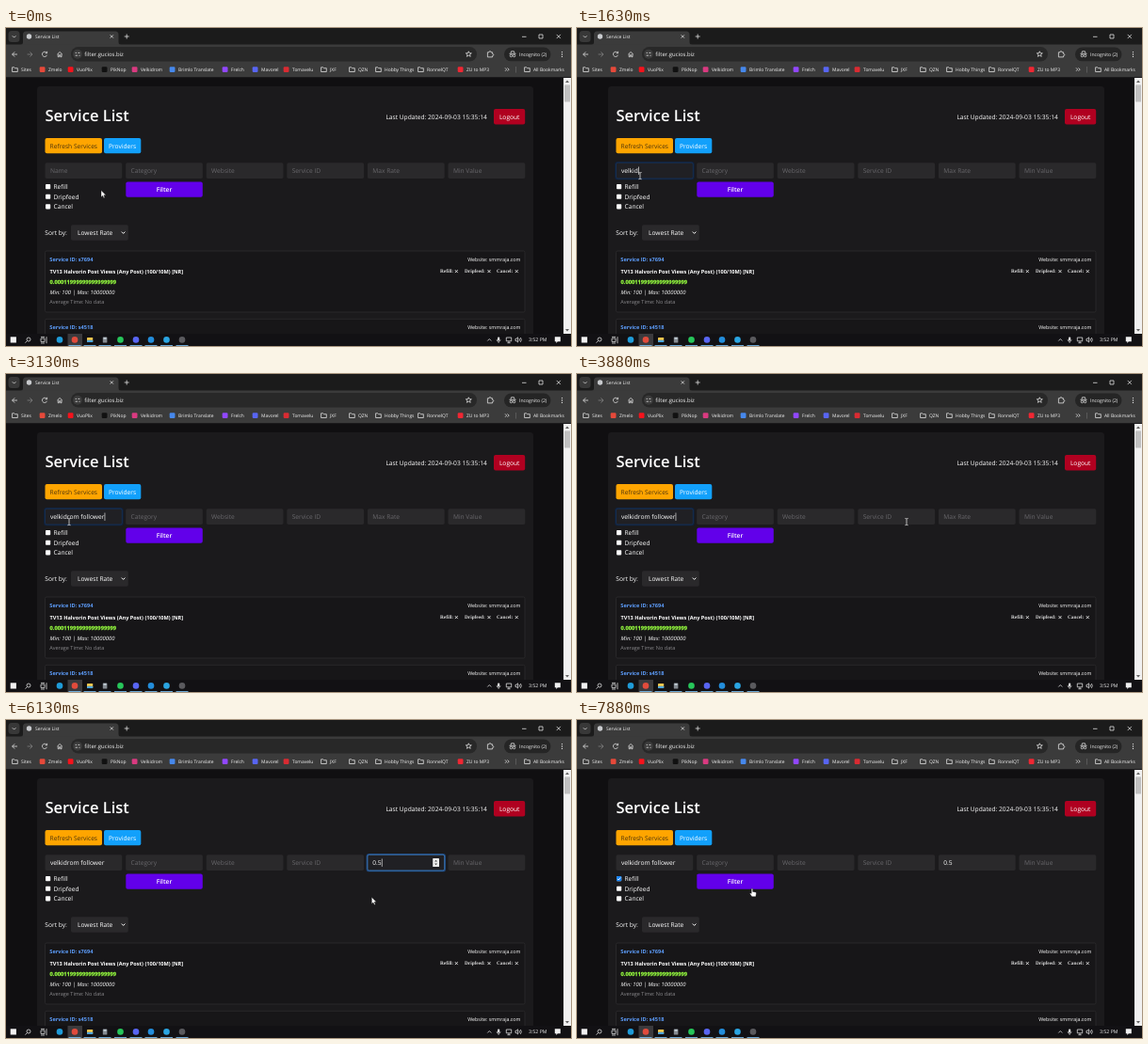
Recreate the animation shown at these times as an HTML page. Size 600 by 338 pixels, loop 8000 ms.

```html
<!DOCTYPE html>
<html lang="en">
<head>
<meta charset="utf-8">
<title>Service List</title>
<style>
  html, body { margin: 0; width: 100%; height: 100%; overflow: hidden; background: #111012; }
  svg { display: block; width: 100vw; height: 100vh; }
  text { font-family: "Open Sans", "Noto Sans", sans-serif; font-size: 6.65px; fill: #fff;
         white-space: pre; text-rendering: geometricPrecision; }
  .ui { font-size: 4.95px; fill: #f4f4f4; }
  .hint { fill: #68676b; }
  .mid { text-anchor: middle; }
  .end { text-anchor: end; }
  .bold { font-weight: 700; }
  .flag { font: 700 5.3px "Liberation Serif", "Noto Serif", serif; fill: #dcdcdc; }
  .line { fill: none; stroke: #e8e8e8; stroke-width: .75; }
</style>
</head>
<body>
<svg id="stage" viewBox="0 0 600 338" preserveAspectRatio="none"></svg>
<script>
const stage = document.getElementById('stage');

const rect = (x, y, w, h, fill, r = 0, extra = '') =>
  `<rect x="${x}" y="${y}" width="${w}" height="${h}" rx="${r}" fill="${fill}" ${extra}/>`;
const dot = (x, y, r, fill) => `<circle cx="${x}" cy="${y}" r="${r}" fill="${fill}"/>`;
const text = (x, y, str, cls = '', style = '') =>
  `<text x="${x}" y="${y}" class="${cls}" style="${style}">${str}</text>`;
const line = (d, style = '') => `<path class="line" d="${d}" style="${style}"/>`;
const cross = (x, y, r, style) =>
  line(`M${x - r} ${y - r}l${2 * r} ${2 * r}M${x + r} ${y - r}l${-2 * r} ${2 * r}`, style);
const folder = x => line(`M${x - 2.8} 41.8h2.2l.9 .9h2.6v3.8h-5.7z`);

function tabStrip() {
  return rect(0, 0, 600, 18, '#1b1b1b')
    + rect(2.5, 3, 12, 12, '#383838', 3.5) + line('M6.8 8.3l1.8 1.8l1.8-1.8')
    + `<path d="M15 18q3 0 3-3V7q0-3.5 3.5-3.5H116q3.5 0 3.5 3.5v8q0 3 3 3z" fill="#3b3b3b"/>`
    + dot(24.5, 9, 2.7, '#c9cbce') + text(31, 10.9, 'Service List', 'ui')
    + cross(112.3, 9, 1.6) + line('M125.7 9h5M128.2 6.5v5')
    + line('M548 9.3h4.5M566 7h4v4h-4z') + cross(586.8, 9, 2.1);
}

function toolbar() {
  return rect(0, 17.5, 600, 35, '#3b3b3b')
    + line('M12 28H6.6M9.2 25.4L6.6 28l2.6 2.6')
    + line('M22.6 28H28M25.4 25.4L28 28l-2.6 2.6', 'stroke:#858585')
    + line('M43.2 26.4a2.6 2.6 0 1 0 .3 2.4M43.6 24.8v2h-2')
    + line('M54.6 27.8l2.5-2.3l2.5 2.3M55.2 27.4v3.3h1.2v-2h1.4v2H59v-3.3')
    + rect(69, 20, 431, 15.6, '#282828', 7.8) + dot(76, 27.8, 5, '#3b3b3b')
    + line('M73.6 26.4h1.4m1.4 0h2M73.6 29.2h2.4m1.4 0h1.2')
    + text(83.3, 29.9, 'filter.gucios.biz', 'ui', 'font-size:5.95px')
    + line('M491.3 24.8l.9 2h2.1l-1.7 1.4l.6 2.1l-1.9-1.2l-1.9 1.2l.6-2.1l-1.7-1.4h2.1z')
    + line('M511.4 25.8h1.6q0-1.2 1-1.2t1 1.2h1.6v1.7q1.2 0 1.2 1t-1.2 1v1.4h-5.2z')
    + rect(529, 20.5, 49.5, 14.8, '#252525', 7.4)
    + line('M534.5 27.3h7M536 26.8l.5-2h3l.5 2')
    + line('M535.2 29.5a1.2 1.2 0 1 0 2.4 0a1.2 1.2 0 1 0-2.4 0M538.4 29.5a1.2 1.2 0 1 0 2.4 0a1.2 1.2 0 1 0-2.4 0')
    + text(545, 29.6, 'Incognito (2)', 'ui', 'font-size:5.1px')
    + [25.6, 28, 30.4].map(y => dot(590.5, y, .65, '#e8e8e8')).join('');
}

function bookmarks() {
  // label x, label, icon colour (none = folder)
  const items = [
    [16, 'Sites'], [45, 'Zmelo', '#e5493a'], [75, 'VuoPlix', '#f5131c'], [111, 'PikNop', '#111'],
    [143, 'Velkidrom', '#d93a80'], [183, 'Brimlo Translate', '#4688ec'], [239, 'Frelch', '#9147ff'],
    [271, 'Mavorel', '#5865f2'], [304, 'Tomavelu', '#d92b32'], [344, 'JXF'], [374, 'QZN'],
    [402, 'Hobby Things'], [447, 'RonnelQT'], [489, 'ZU to MP3', '#ef2733'], [560, 'All Bookmarks']
  ];
  return items.map(([x, label, color]) =>
    (color ? rect(x - 9.3, 41.2, 5.8, 5.8, color, 1.2) : folder(x - 6.6)) + text(x, 46, label, 'ui')).join('')
    + line('M530 42.4l1.7 1.7l-1.7 1.7M532.5 42.4l1.7 1.7l-1.7 1.7') + line('M541.5 41v6.5', 'stroke:#666');
}

const fieldX = i => 41.5 + i * 85.6;
const field = (i, hint) => rect(fieldX(i), 143.2, 81.8, 16.8, '#2a292b', 1.8)
  + text(fieldX(i) + 5.4, 154.3, hint, 'hint');

function card(y, id) {
  return rect(41.5, y, 509.5, 65, '#171618', 1.5, 'stroke="#302f32" stroke-width=".7"')
    + text(46.3, y + 11, `Service ID: ${id}`, 'bold', 'font-size:5.6px;fill:#5d9dfb')
    + text(546.5, y + 11, 'Website: smmraja.com', 'end', 'font-size:5.3px');
}

function page() {
  const flags = [[461, 'Refill:', 478.3], [487, 'Dripfeed:', 513], [521, 'Cancel:', 542.3]];
  return rect(0, 52.5, 600, 272.5, '#100f11')
    + rect(33, 62, 527, 280, '#1b1a1c', 3.5)
    + text(41.5, 99.2, 'Service List', '', 'font-size:16.55px;font-weight:600')
    + text(403.4, 96.8, 'Last Updated: 2024-09-03 15:35:14')
    + rect(518, 86, 33.2, 16.4, '#b00020', 2) + text(534.7, 96.8, 'Logout', 'mid', 'font-weight:500')
    + rect(41.5, 117, 60.5, 16.2, '#ffa500', 2)
    + text(71.8, 127.6, 'Refresh Services', 'mid', 'fill:#4a340c')
    + rect(104, 117, 39.3, 16.2, '#12a0fb', 2) + text(123.6, 127.6, 'Providers', 'mid', 'font-weight:500')
    + ['', 'Category', 'Website', 'Service ID', '', 'Min Value'].map((hint, i) => field(i, hint)).join('')
    + rect(127.3, 163.4, 81.5, 16.4, '#6200ea', 2) + text(168, 174.1, 'Filter', 'mid', 'font-weight:600')
    + ['Refill', 'Dripfeed', 'Cancel'].map((label, i) =>
        rect(42, 166.1 + i * 10.55, 5.2, 5.2, '#fff', .8) + text(50.5, 171.3 + i * 10.55, label)).join('')
    + text(41.3, 220.3, 'Sort by:') + rect(69, 209.3, 60.8, 16.5, '#2a292b', 1.8)
    + text(76, 220.3, 'Lowest Rate') + line('M122.8 216.6l1.8 1.8l1.8-1.8', 'stroke-width:1;stroke:#fff')
    + card(237, 's7694')
    + text(46.5, 260.7, 'TV13 Halvorin Post Views (Any Post) (100/10M) [NR]', 'bold', 'font-size:5.6px')
    + text(46.5, 271.6, '0.00011999999999999999', 'bold',
        'font-size:5.75px;fill:#93f83e;stroke:#93f83e;stroke-width:.25')
    + text(46.5, 282.5, 'Min: 100 | Max: 10000000', '', 'font-size:5.9px;font-style:italic')
    + text(46.3, 293.3, 'Average Time: No data', '', 'font-size:5.5px;fill:#8b8a8d')
    + flags.map(([x, label, cx]) => text(x, 260.3, label, 'flag') + cross(cx, 258.6, 1.5, 'stroke-width:.9')).join('')
    + card(309.3, 's4518')
    + rect(592, 53, 8, 272, '#f1f1f1') + rect(593, 60.5, 6, 18, '#c1c1c1')
    + `<path d="M594 58l2-2.4l2 2.4zM594 320l2 2.4l2-2.4z" fill="#606060"/>`;
}

function taskbar() {
  const apps = [[57, '#1f9bd8'], [73, '#e14b3c'], [121.5, '#27c65a'], [138, '#5865f2'],
    [154, '#238ddb'], [170.5, '#2aa5e2'], [187, '#5a5a5e']];
  return rect(0, 325, 600, 13, '#121114') + rect(65.5, 325, 15.5, 13, '#3b3a3d')
    + [73, 89, 105, 121.5, 138, 154, 170.5, 187].map(x => rect(x - 6.5, 337.1, 13, .9, '#76b9ed')).join('')
    + rect(4.7, 328.3, 6.2, 6.2, '#f2f2f2')
    + line('M22.4 332.6l-2 2M22 331a2 2 0 1 0 4 0a2 2 0 1 0-4 0')
    + line('M37 330h4v3.4h-4zM37 328.4h4M37 335h4M43 328.2v7')
    + apps.map(([x, color]) => dot(x, 331.4, 3.3, color)).join('')
    + rect(86, 329, 6.2, 5, '#f3c64c', .6) + rect(86, 331.8, 6.2, 2.2, '#4ba3dc', .4)
    + rect(102.8, 328.4, 4.6, 6, '#858b92', .5) + rect(103.6, 329.2, 3, 1.3, '#d8e4ec')
    + line('M511.3 332.5l2-2l2 2') + rect(522, 328.6, 2.2, 3.6, '#e8e8e8', 1)
    + line('M521.2 331.2q0 2 1.9 2t1.9-2M523.1 333.2v1.5')
    + line('M531.3 329h5.4v3.8h-5.4zM534 333v1.6M532.4 334.7h3.2')
    + line('M541 330.3h1l1.6-1.5v5.2L542 332.5h-1zM545 330q1 1.4 0 2.8M546.4 329q1.8 2.4 0 4.8')
    + text(555, 333.3, '3:52 PM', 'ui', 'font-size:5.2px')
    + `<path d="M582.8 328.3h6v5h-3l-1.5 1.6v-1.6h-1.5z" fill="#f0f0f0"/>`;
}

const ring = (id, i, color, glow) => `<g id="${id}">`
  + rect(fieldX(i) - .6, 142.6, 83, 18, 'none', 2.2, `stroke="${glow}" stroke-width="1.4"`)
  + rect(fieldX(i), 143.2, 81.8, 16.8, '#202024', 1.8, `stroke="${color}" stroke-width=".8"`) + '</g>';

stage.innerHTML = tabStrip() + toolbar() + bookmarks() + page()
  + ring('nameRing', 0, '#15335c', '#10213c') + ring('rateRing', 4, '#4186cf', '#1d457a')
  + text(46.9, 154.3, '', '', '" id="name') + text(389.3, 154.3, '', '', '" id="rate')
  + '<g id="spin">' + rect(453.2, 147, 6.8, 9, '#ececec', .6)
  + '<path d="M455.2 150.4l1.4-1.7l1.4 1.7zM455.2 152.6l1.4 1.7l1.4-1.7z" fill="#444"/></g>'
  + rect(0, 147.5, .6, 8.4, '#fff', 0, 'id="caret"')
  + '<g id="check">' + rect(42, 166.1, 5.2, 5.2, '#1684ff', .8)
  + line('M43 168.8l1.2 1.2l2.1-2.6', 'stroke:#fff;stroke-width:.9') + '</g>'
  + taskbar()
  + `<g id="pointer">
      <path id="arrow" d="M0 0v7.2l1.7-1.5l1.1 2.5l1.2-.5l-1.1-2.5h2.3z" fill="#fff" stroke="#000" stroke-width=".4"/>
      <path id="beam" class="line" d="M-1.6-3.5q1.6 0 1.6 .7q0-.7 1.6-.7M0-2.8v5.8M-1.6 3.7q1.6 0 1.6-.7q0 .7 1.6 .7"/>
      <path id="hand" d="M-.8 .4q.8-1 1.5 0v3l3 .6q.8 .3 .7 1.2l-.5 3.6h-4.1l-2.4-3.2q.3-1 1.2-.5l.6 .5z" fill="#fff" stroke="#000" stroke-width=".4"/>
    </g>`;

const part = Object.fromEntries([...stage.querySelectorAll('[id]')].map(node => [node.id, node]));
const show = (node, on) => node.style.display = on ? '' : 'none';

// Tables are keyed by beat; a value holds until the next row.
const BEAT = 125, LOOP = 8000;
const query = 'velkidrom follower', limit = '0.5';
const nameKeys = [[0, 0], [9, 1], [10, 2], [11, 4], [12, 5], [13, 6], [15, 7], [16, 8], [17, 9], [18, 11],
  [19, 12], [20, 13], [21, 14], [22, 15], [23, 16], [24, 17], [25, 18]];
const rateKeys = [[0, 0], [42, 1], [43, 2], [46, 3]];
const focusKeys = [[0, ''], [8, 'name'], [34, 'rate'], [50, '']];
const pointerKeys = [
  [0, 101, 172.5], [1, 98, 171], [2, 92, 168], [3, 83, 163], [4, 75, 159], [5, 70, 158], [6, 67, 157],
  [27, 82, 157], [28, 130, 158], [29, 206, 158], [30, 288, 158], [31, 350, 157], [32, 394, 157], [33, 409, 156.5],
  [49, 388.3, 188.3], [50, 345, 193], [51, 262, 197], [52, 172, 194], [53, 104, 187], [54, 59.7, 178.3],
  [55, 53, 173], [56, 48, 170], [57, 45, 168], [59, 62, 171], [60, 130, 183], [61, 203, 197],
  [62, 198, 195], [63, 186, 179]
];
const at = (keys, beat) => keys.findLast(row => row[0] <= beat);
const within = (x, y, left, top, w, h) => x >= left && x <= left + w && y >= top && y <= top + h;

function fill(input, value, hint) {
  input.textContent = value || hint;
  input.setAttribute('class', value ? '' : 'hint');
}

function draw(time) {
  const beat = Math.floor(time / BEAT);
  const focus = at(focusKeys, beat)[1];
  const [, x, y] = at(pointerKeys, beat);
  const values = {
    name: query.slice(0, at(nameKeys, beat)[1]),
    rate: limit.slice(0, at(rateKeys, beat)[1])
  };
  fill(part.name, values.name, 'Name');
  fill(part.rate, values.rate, 'Max Rate');

  show(part.nameRing, focus === 'name');
  show(part.rateRing, focus === 'rate');
  part.nameRing.style.opacity = beat === 8 ? .5 : 1;
  part.rateRing.style.opacity = beat === 34 ? .5 : 1;
  show(part.caret, focus && beat !== 40 && beat !== 41);
  if (focus) {
    const input = part[focus];
    const width = values[focus] ? input.getComputedTextLength() : 0;
    part.caret.setAttribute('x', +input.getAttribute('x') + width + .2);
  }

  const overField = [0, 1, 2, 3, 4, 5].some(i => within(x, y, fieldX(i), 143, 82, 17));
  const overButton = within(x, y, 127, 163, 82, 17);
  show(part.spin, focus === 'rate' || within(x, y, fieldX(4), 143, 82, 17));
  show(part.check, beat >= 58);
  show(part.beam, overField);
  show(part.hand, overButton);
  show(part.arrow, !overField && !overButton);
  part.pointer.setAttribute('transform', `translate(${x} ${y})`);
}

const start = performance.now();
function tick() {
  draw((performance.now() - start) % LOOP);
  requestAnimationFrame(tick);
}
tick();
</script>
</body>
</html>
```
